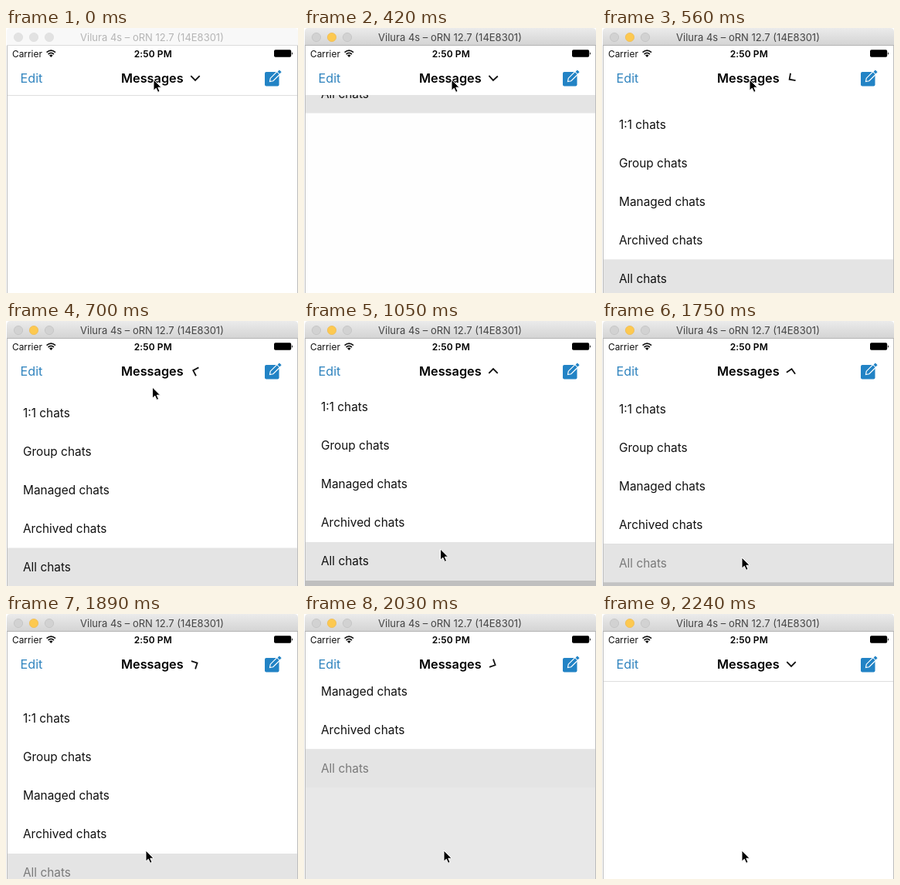
These frames come from a looping animation (378 px wide and 344 px high, 2.45 s). An HTML page:

```html
<!DOCTYPE html>
<html lang="en">
<head>
<meta charset="utf-8">
<title>Chat filter menu</title>
<style>
  html, body { margin: 0; width: 100%; height: 100%; overflow: hidden; background: #fff; }
  svg { display: block; width: 378px; height: 344px; font-family: Inter, Roboto, sans-serif; }
</style>
</head>
<body>
<svg viewBox="0 0 378 344">
  <defs>
    <linearGradient id="chrome" x2="0" y2="1">
      <stop stop-color="#ebebeb"/>
      <stop offset="1" stop-color="#d3d3d3"/>
    </linearGradient>
    <clipPath id="content"><rect x="2" y="87" width="375" height="257"/></clipPath>
  </defs>

  <rect width="378" height="344" fill="#fff"/>

  <!-- drop-down -->
  <path d="M2 87.5H377" stroke="#dedede"/>
  <g clip-path="url(#content)">
    <rect id="dim" x="2" y="87" width="375" height="257" opacity="0"/>
    <g id="menu">
      <rect x="2" y="-80" width="375" height="280" fill="#fff"/>
      <rect x="2" y="200" width="375" height="50" fill="#e4e4e4"/>
      <g id="rows" font-size="15.4" fill="#111"></g>
    </g>
  </g>

  <!-- status bar -->
  <text x="8" y="37.5" font-size="11.9" fill="#111">Carrier</text>
  <g fill="none" stroke="#111" stroke-width="1.7">
    <path d="M52.6 31.6Q58.3 26.6 64 31.6"/>
    <path d="M54.6 34Q58.3 30.8 62 34"/>
  </g>
  <path d="M56 35.4Q58.3 33.6 60.6 35.4L58.3 38Z" fill="#111"/>
  <text x="190.3" y="37.5" font-size="12" font-weight="600" letter-spacing=".1" text-anchor="middle">2:50 PM</text>
  <rect x="347" y="28.3" width="22.2" height="9.4" rx="1.8"/>
  <path d="M370 31.2Q372 33 370 34.8Z"/>

  <!-- navigation bar -->
  <text x="18.5" y="71" font-size="16.2" fill="#3285bf">Edit</text>
  <text x="149" y="71" font-size="16.3" font-weight="600">Messages</text>
  <path id="chevron" d="M239.3 62.2L245 67.9L250.7 62.2" fill="none" stroke="#111" stroke-width="1.8"/>
  <rect x="335" y="57" width="18.5" height="18.5" rx="2" fill="#2283c5"/>
  <g transform="translate(341.5 69.5) rotate(-45)">
    <path d="M0 0L3.6 -2.5H20V2.5H3.6Z" fill="#2283c5" stroke="#fff" stroke-width="1.2"/>
    <path d="M15.6 -2.5V2.5" stroke="#fff"/>
  </g>

  <!-- window frame -->
  <path d="M1.5 22V344M377.5 22V344" stroke="#bdbdbd"/>
  <path id="bar" d="M1 23V5Q1 0 6 0H373Q378 0 378 5V23Z"/>
  <path id="edge" d="M1 22.5H378"/>
  <g id="lights" stroke-width=".8"></g>
  <text id="title" x="189" y="17" font-size="13" text-anchor="middle">Vilura 4s – oRN 12.7 (14E8301)</text>

  <path id="cursor" d="M0 0V14.2L3.3 11.2L5.7 16.4L8.1 15.3L5.8 10.2H10.2Z" stroke="#fff" stroke-width="1"/>
</svg>

<script>
const LOOP = 2450, STEP = 70;
const OPEN = 413, CLOSE = 1722;
const DROP = 340, LIFT = 360, TURN = 480;
const TOP = 87, HEIGHT = 250, ROW = 50;

const labels = ['1:1 chats', 'Group chats', 'Managed chats', 'Archived chats', 'All chats'];
// time, x, y of the pointer tip
const pointer = [
  [0, 191, 67], [630, 191, 67], [700, 189.5, 86], [840, 184, 178],
  [980, 178, 274], [1050, 176.5, 296], [1120, 177.5, 301], [1330, 181, 307], [LOOP, 181, 307]
];

const $ = id => document.getElementById(id);
const set = (el, attrs) => {
  for (const key in attrs) el.setAttribute(key, attrs[key]);
  return el;
};
const add = (parent, tag, attrs) =>
  parent.appendChild(set(document.createElementNS('http://www.w3.org/2000/svg', tag), attrs));

const rows = labels.map((label, i) => {
  const row = add($('rows'), 'text', { x: 22, y: i * ROW + 30.3 });
  row.textContent = label;
  return row;
});
const lights = [16, 36, 56].map(x => add($('lights'), 'circle', { cx: x, cy: 12, r: 5.6 }));

const part = (t, start, length) => Math.min(1, Math.max(0, (t - start) / length));
const backIn = p => p * p * (2.70158 * p - 1.70158);
const backOut = p => 1 - backIn(1 - p);

function pointerAt(t) {
  const i = pointer.findIndex((p, n) => n && t <= p[0]);
  const a = pointer[i - 1], b = pointer[i];
  const k = (t - a[0]) / (b[0] - a[0]);
  return [a[1] + (b[1] - a[1]) * k, a[2] + (b[2] - a[2]) * k];
}

function drawWindow(active) {
  set($('bar'), { fill: active ? 'url(#chrome)' : '#f8f8f8' });
  set($('edge'), { stroke: active ? '#b4b4b4' : '#dcdcdc' });
  set($('title'), { fill: active ? '#444' : '#b5b5b5' });
  lights.forEach((light, i) => {
    const lit = active && i === 1;
    set(light, {
      fill: lit ? '#fdc950' : active ? '#d2d2d2' : '#e2e2e2',
      stroke: lit ? '#efbc52' : active ? '#c2c2c2' : '#dedede'
    });
  });
}

function draw(t) {
  const shown = backOut(part(t, OPEN, DROP)) - backIn(part(t, CLOSE, LIFT));
  const opening = part(t, OPEN, TURN), closing = part(t, CLOSE, TURN);

  drawWindow(t >= STEP);
  set($('menu'), {
    transform: `translate(0 ${TOP + (shown - 1) * HEIGHT})`,
    visibility: t < OPEN || t >= CLOSE + LIFT ? 'hidden' : 'visible'
  });
  set($('dim'), { opacity: 0.25 * (opening - closing) });
  set($('chevron'), { transform: `rotate(${180 * (opening + closing)} 245 65)` });
  set(rows[4], { opacity: t >= CLOSE ? 0.5 : 1 });
  set($('cursor'), { transform: `translate(${pointerAt(t).join(' ')})` });
}

const begin = performance.now();
function tick() {
  const t = (performance.now() - begin) % LOOP;
  draw(Math.floor(t / STEP) * STEP);
  requestAnimationFrame(tick);
}
tick();
</script>
</body>
</html>
```
